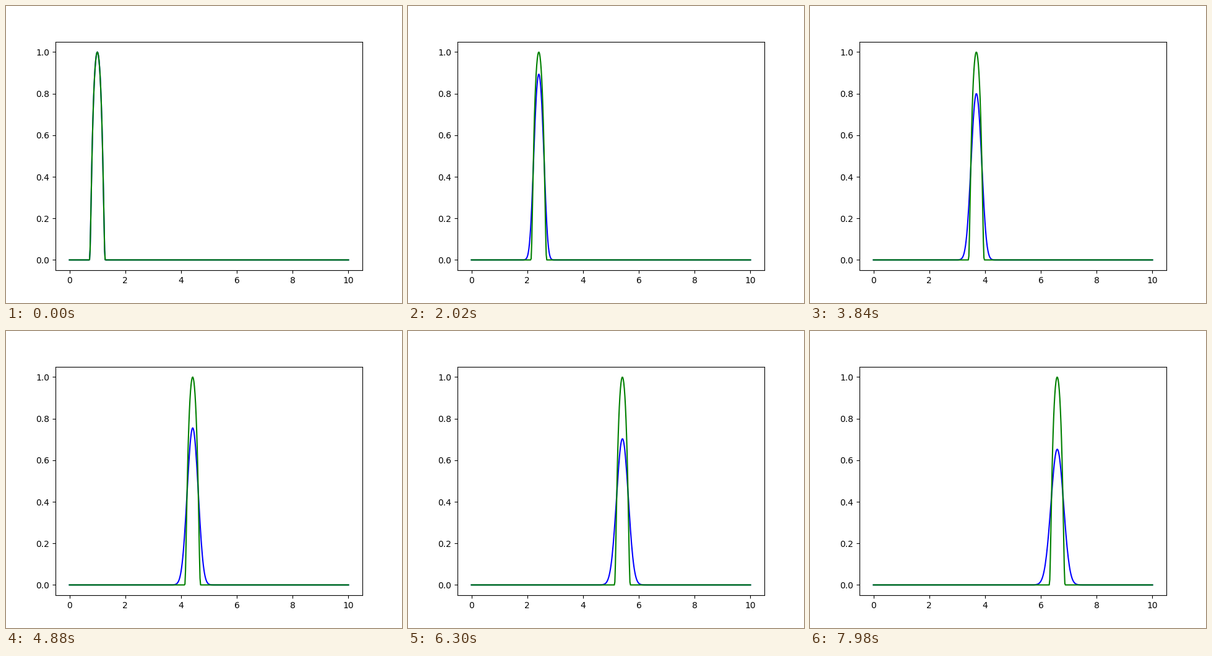
A matplotlib script for the animation above (8000 ms loop, 640 by 480 pixels).

```python
import numpy as np
import matplotlib.pyplot as plt
from matplotlib.animation import FuncAnimation

FRAMES = 400
INTERVAL = 20
LENGTH = 10.0
CELLS = 500
COURANT = 0.7
START, HALF_WIDTH = 1.0, 0.3

x = np.linspace(0, LENGTH, CELLS + 1)
dx = LENGTH / CELLS


def bump(center):
    """Smooth bump of height 1 that vanishes outside its half width."""
    z = (x - center) / HALF_WIDTH
    inside = np.abs(z) < 1 - 1e-9
    y = np.zeros_like(x)
    y[inside] = np.exp(1 - 1 / (1 - z[inside] ** 2))
    return y


def upwind(steps):
    """First-order upwind solution of the advection equation."""
    u = np.zeros((steps, x.size))
    u[0] = bump(START)
    for n in range(1, steps):
        u[n, 1:] = u[n - 1, 1:] - COURANT * np.diff(u[n - 1])
    return u


numeric = upwind(FRAMES)

fig, ax = plt.subplots(figsize=(6.4, 4.8), dpi=100)
ax.set_xlim(-0.5, 10.5)
ax.set_ylim(-0.05, 1.05)
numeric_line, = ax.plot(x, numeric[0], color="blue", lw=1.5)
exact_line, = ax.plot(x, bump(START), color="green", lw=1.5)


def update(n):
    numeric_line.set_ydata(numeric[n])
    exact_line.set_ydata(bump(START + COURANT * dx * n))
    return numeric_line, exact_line


anim = FuncAnimation(fig, update, frames=FRAMES, interval=INTERVAL,
                     init_func=lambda: update(0), repeat=True, repeat_delay=0)
plt.show()
```
